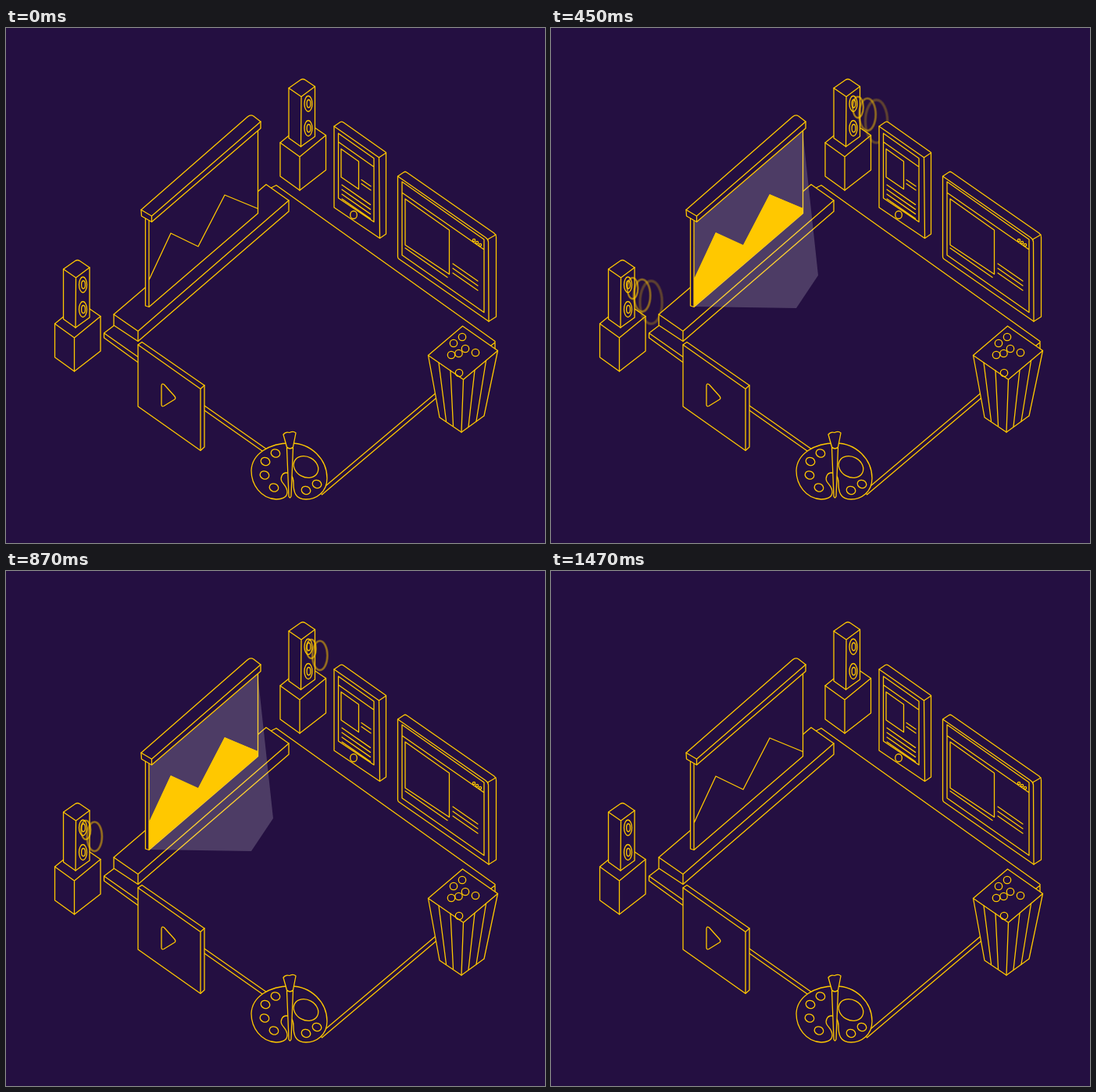
An HTML page with a canvas for the animation above (1530 ms loop, 690 by 660 pixels).

```html
<!DOCTYPE html>
<html lang="en">
<head>
<meta charset="utf-8">
<title>Media stage</title>
<style>
html, body { margin: 0; width: 100%; height: 100%; overflow: hidden; background: #240f41; }
canvas { display: block; }
</style>
</head>
<body>
<canvas id="stage" width="690" height="660"></canvas>
<script>
const ctx = document.getElementById('stage').getContext('2d');
const BACK = '#240f41', GOLD = '#ffc800';
const LOOP = 1530, STEP = 30;
const WAVE_STARTS = [75, 195, 315, 645, 765], WAVE_LENGTH = 490;
const clamp = x => Math.max(0, Math.min(1, x));

// Outlines are opaque shapes; lines are open strokes.
function outline(d) {
  const path = new Path2D(d);
  ctx.fillStyle = BACK;
  ctx.fill(path);
  ctx.stroke(path);
}

function lines(d) {
  ctx.stroke(new Path2D(d));
}

function fill(d, color) {
  ctx.fillStyle = color;
  ctx.fill(new Path2D(d));
}

function oval(x, y, rx, ry = rx, turn = 0) {
  ctx.beginPath();
  ctx.ellipse(x, y, rx, ry, turn, 0, Math.PI * 2);
  ctx.stroke();
}

function slanted(x, y, length, rows, gap) {
  for (let i = 0; i < rows; i++) {
    lines(`M${x} ${y + i * gap}l${length} ${length * 0.695}`);
  }
}

function drawFloor() {
  lines('M339 205L346 201.500L626 401.500V411M626 403L617 410');
  lines('M138 381.500L125.500 391V397L169 428.500M125.500 391L169 421.500');
  lines('M254 484L334 540M254 490L328 542');
  lines('M409 587L550 468M402 594L404.500 598L551 474');
}

function drawSpeaker() {
  outline('M351 147L384 120L409.500 137.500V182L376 208L351 190Z');
  lines('M351 147L376 165L409.500 137.500M376 165V208');
  outline('M362 77L377 66.500Q380 64.500 383 66.500L395.500 75V139L377.500 152L362 141Z');
  lines('M362 77L378 88L395.500 75M378 88L377.500 152');
  for (const y of [97, 128.5]) {
    oval(387, y, 5, 10);
    oval(387.5, y, 2.4, 5);
  }
}

function drawWaves(time) {
  ctx.save();
  for (const start of WAVE_STARTS) {
    const u = (time - start) / WAVE_LENGTH;
    if (u < 0 || u >= 1) continue;
    const e = (1 - Math.cos(Math.PI * u)) / 2;
    ctx.globalAlpha = (1 - u) * 0.42;
    for (const soft of [0.7, 1.15, 1.6]) {
      ctx.lineWidth = (1.4 + 1.6 * e) * soft;
      oval(387 + 34 * e, 97 + 26 * e, 5 + 10.5 * e, 10 + 20 * e);
    }
  }
  ctx.restore();
}

function drawScreen(light) {
  outline('M138 367L333 200.500L362 221V235L169 401.500L138 381Z');
  lines('M138 367L169 388.500L362 221M169 388.500V401');
  outline('M178.500 243L322.500 125V237.500L183 357.500L178.500 356Z');
  ctx.globalAlpha = light;
  fill('M183 249L322 131L342 317L314 359L183 357Z', 'rgba(255,255,255,.19)');
  fill('M183 323L211 262L246 278L280 213L322 231V238L183 357Z', GOLD);
  ctx.globalAlpha = 1;
  lines('M183 247V357M183 323L211 263L246 280L280 214L322.500 231.500');
  outline('M173 233L309 114Q313 110.500 317 113L326 120V128.500L186.500 248.500L173.500 241Z');
  lines('M173 233L186.500 241L326 120M186.500 241V248');
}

function drawPhone() {
  outline('M420 126L428 120.500Q430 119.500 432 121L486.500 159.500V264L478.500 269.500L420 230Z');
  lines('M420 126L477.500 166L478.500 269M477.500 166L486.500 160');
  lines('M425.500 135L471 167V248.500L425.500 218ZM425.500 146L471 178');
  lines('M429 155L451.500 171V206.500L429 191Z');
  slanted(455, 194.5, 12, 2, 5);
  slanted(430, 201, 36.5, 4, 6);
  oval(445, 239.5, 4.3, 5);
}

function drawTablet() {
  outline('M501.500 190L509 185Q511 183.500 513 185L625 263Q627.500 265 627.500 268V370L618 376L503 296Q501.500 295 501.500 293Z');
  lines('M501.500 190L614 268.500Q617.500 271 617.500 274L618 376M616.500 271L627 265');
  lines('M507 197L612 271V364.500L507 291ZM507 211L612 284');
  lines('M511 219L567.500 259V315.500L511 278Z');
  slanted(511, 282, 54, 1, 6);
  slanted(572, 302, 32, 3, 6);
  for (let i = 0; i < 3; i++) oval(599 + i * 4, 272 + i * 3, 1.6);
}

function drawPlayer() {
  outline('M169 406L174 402.500L254 458V537L249 541.500L169 485Z');
  lines('M169 406L249 462.500L254 458M249 462.500V541');
  lines('M199 459Q199 454.500 202.500 457L215.500 471.500Q218.500 475 215 476.500L202 484.500Q199 486 199 482Z');
}

function drawPalette() {
  outline('M314 567C315 545 338 532 364 532C391 532 411 553 411 577C411 595 397 604 384 604' +
    'C370 604 368 594 368 583C368 575 364 570 359 570C353 570 351 577 353 581' +
    'C356 586 360 588 360 595C360 602 352 604 346 604C326 603 314 585 314 567Z');
  const wells = [[345, 545], [332, 555.5], [331, 573], [343, 589], [384, 592.5], [398, 584.5]];
  for (const [x, y] of wells) oval(x, y, 5.9, 5, 0.4);
  oval(384, 562.5, 16.5, 13, 0.5);
  outline('M359.500 538L362 600Q363.500 604 365 600L367.500 538Z');
  outline('M355 521Q358 517 363 518.500Q368 516 371 519L367.500 537Q363.500 541 359.500 537Z');
}

function drawPopcorn() {
  outline('M540.500 419.500L584.500 382L629.500 413.500L612 497L583 518L555 499Z');
  lines('M540.500 419.500L585.500 450.500L629.500 413.500M585.500 450.500L583 518');
  lines('M554 429L563.500 504M569 439L572.500 510M600 438.500L592 511M614.500 426.500L602 504');
  const kernels = [[584, 396], [573, 404], [588, 411], [601, 416], [579.5, 417], [570, 419], [580, 442]];
  for (const [x, y] of kernels) oval(x, y, 4.7);
}

function draw(time) {
  ctx.fillStyle = BACK;
  ctx.fillRect(0, 0, 690, 660);
  ctx.strokeStyle = GOLD;
  ctx.lineWidth = 1.3;
  ctx.lineJoin = ctx.lineCap = 'round';
  drawFloor();
  for (const [dx, dy] of [[0, 0], [-288.5, 232]]) {
    ctx.save();
    ctx.translate(dx, dy);
    drawSpeaker();
    drawWaves(time);
    ctx.restore();
  }
  const light = clamp((time - 330) / 120) * clamp((1470 - time) / 150);
  drawScreen(light);
  drawPhone();
  drawTablet();
  drawPlayer();
  drawPalette();
  drawPopcorn();
}

const origin = performance.now();
function tick() {
  const time = (performance.now() - origin) % LOOP;
  draw(Math.floor(time / STEP) * STEP);
  requestAnimationFrame(tick);
}
tick();
</script>
</body>
</html>
```
